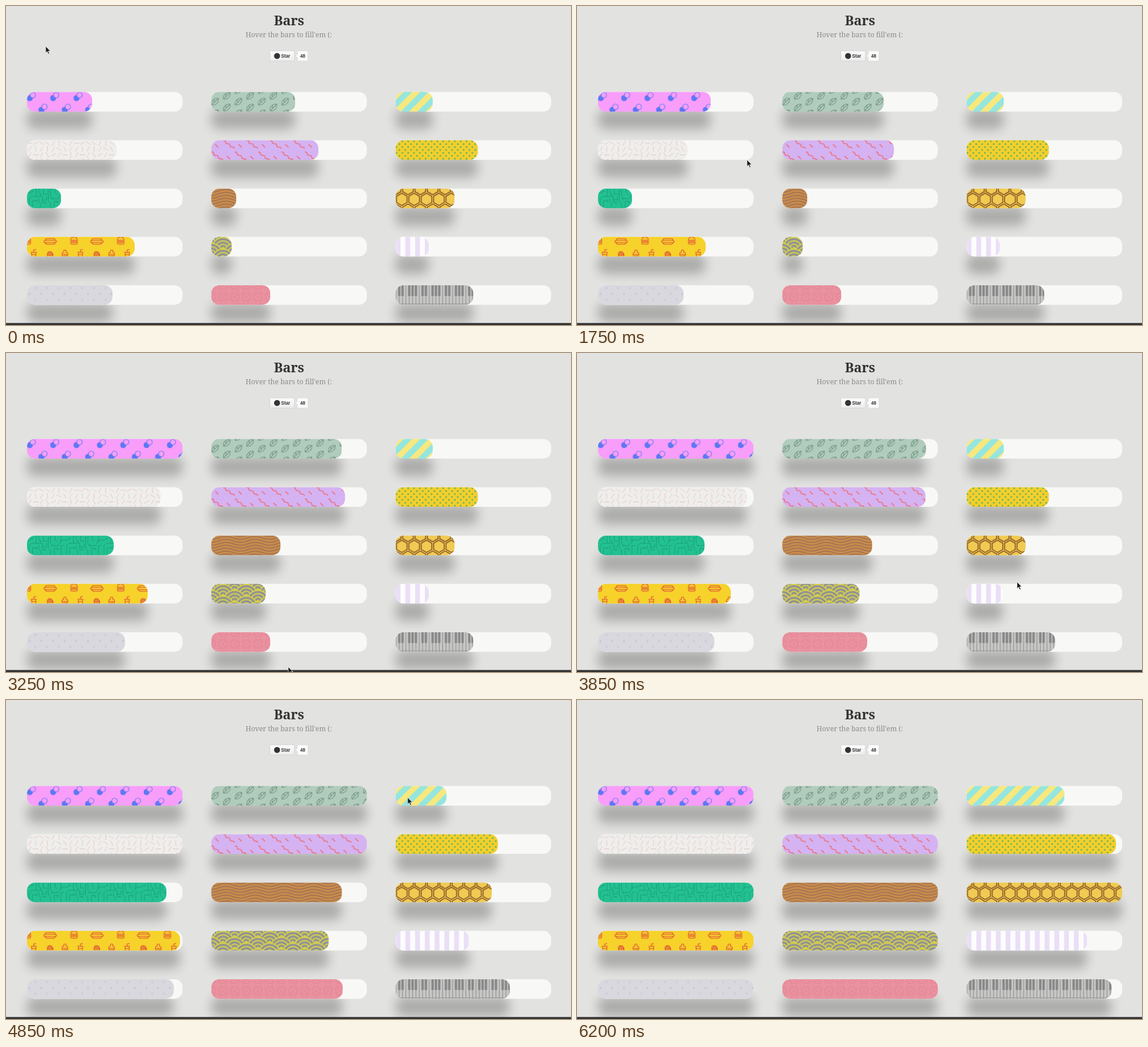
These frames come from a looping animation (997x562 px, 6250 ms). An HTML page:

```html
<!DOCTYPE html>
<html lang="en">
<head>
<meta charset="utf-8">
<title>Bars</title>
<style>
html, body { margin: 0; width: 100%; height: 100%; overflow: hidden; background: #e2e2e0; }
svg { display: block; }
.shadow { filter: blur(9.5px); opacity: .24; }
.slab { font-family: "Noto Serif", serif; text-anchor: middle; }
.btn { font: bold 8.2px "Liberation Sans", Arial, sans-serif; fill: #333; }
</style>
</head>
<body>
<svg id="stage" width="997" height="562" viewBox="0 0 997 562"></svg>
<script>
const LOOP = 6250, FULL = 274.5, HEIGHT = 34.5, U = 41.2;

// Small drawing helpers that return SVG markup
const rect = (x, y, w, h, fill) => `<rect x="${x}" y="${y}" width="${w}" height="${h}" fill="${fill}"/>`;
const disc = (x, y, r, fill) => `<circle cx="${x}" cy="${y}" r="${r}" fill="${fill}"/>`;
const ring = (x, y, r, stroke, width = 1, fill = 'none') =>
  `<circle cx="${x}" cy="${y}" r="${r}" fill="${fill}" stroke="${stroke}" stroke-width="${width}"/>`;
const line = (d, stroke, width = 1) => `<path d="${d}" fill="none" stroke="${stroke}" stroke-width="${width}"/>`;
const at = (x, y, body) => `<g transform="translate(${x} ${y})">${body}</g>`;
const times = (n, fn) => Array.from({ length: n }, (_, i) => fn(i)).join('');
const tile = (w, h, bg, body, transform = '') => ({ w, h, transform, body: rect(0, 0, w, h, bg) + body });
const SMALL = `scale(${U / 80})`;

let seed = 7;
const random = () => (seed = seed * 16807 % 2147483647) / 2147483647;

function bubbles() {
  const pair = disc(0, 0, 5.4, '#5d78f4') + ring(5.3, -5.2, 4.8, '#5d78f4', 1.1, '#f89dfa');
  return tile(U, U, '#f89dfa', at(5, 10.7, pair) + at(25.6, 31.3, pair));
}

function leaves() {
  const leaf = line('M64.3 1.8A19 19 0 0 1 41.8 24.3A19 19 0 0 1 64.3 1.8L41.8 24.3M49.9 16V4.5', '#6d917c', 2);
  return tile(80, 40, '#b1ccbc', at(0, 0, leaf) + at(-40, 20, leaf) + at(-40, -20, leaf), SMALL);
}

function diagonal() {
  const p = U / 2;
  return tile(p, p, '#f7e87e', rect(p / 2, 0, p / 2, p, '#94e6df'), 'rotate(45)');
}

function dashes() {
  const c = U / 4;
  const dash = i => {
    const a = Math.floor(random() * 6) * Math.PI / 6;
    const dx = Math.cos(a) * 5, dy = Math.sin(a) * 5;
    const x = (i % 8 + .5) * c, y = (Math.floor(i / 8) + .5) * c;
    return line(`M${x - dx} ${y - dy}L${x + dx} ${y + dy}`, i % 3 ? '#e6bbb3' : '#d2cbc6', .9);
  };
  return tile(U * 2, U, '#efeeec', times(32, dash));
}

function squiggles() {
  const wave = line('M0 0q4 0 4 3t4 3t4 3t4 3t4 3', '#f0645f', 1.4);
  const dash = line('M0 0l5.5 5.5', '#f0645f', 1.4);
  return tile(U, U, '#d5b2f2', at(21, 0, wave) + at(.4, 20.6, wave) + at(7, 7, dash) + at(27.6, 27.6, dash));
}

function dots() {
  const ink = '#63b35c';
  return tile(20, 20, '#f3cf2c', disc(3, 3, 3, ink) + disc(13, 13, 3, ink), SMALL);
}

function circuit() {
  const ink = '#159370';
  const nodes = [[12, 6], [30, 13], [47, 5], [56, 22], [21, 27], [40, 31], [75, 12], [68, 30]];
  return tile(U * 2, U, '#23c191',
    line('M0 10h6l6-4M5 41V22l5-5h10v-17M12 41V27h9M26 0v8l4 5M20 17h14v14h6M36 0v12h11V5M52 0v17l4 5'
      + 'M47 12v16l5 5v8M30 41v-8l-4-4v-8M60 41V28h8M56 22h13l6-10M62 0v9l5 5M82 10h-7V0M75 41V22h7M34 25h9v-8', ink)
    + nodes.map(([x, y]) => ring(x, y, 1.4, ink, 1, '#23c191')).join(''), 'scale(.8)');
}

function wood() {
  return tile(100, 20, '#c78c4b', times(4, i =>
    line(`M0 ${i * 10 - 7}c25 0 25-10 50-10s25 10 50 10`, '#91655a', 2.2)), SMALL);
}

function honeycomb() {
  const ink = '#7c4a20';
  return tile(28, 49, '#f0ca52',
    line('M14 10.4l12 6.9v13.9l-12 6.9L2 31.2V17.3z', ink, 2)
    + line('M0 13.8l12-6.9V0M0 34.7l12 6.9V49M16 0v6.9l12 6.9M16 49v-7.4l12-6.9', ink, 2), 'scale(.78)');
}

function food() {
  const draw = d => line(d, '#dc3f38', 1.05);
  const burger = draw('M-6-1q0-6 6-6t6 6zM-7 1H7M-6 3H6q0 3-3 3H-3q-3 0-3-3M-2-4h1M2-4h1');
  const hotdog = draw('M-8-1q-2-4 2-4H6q4 0 2 4M-11 0q0-2 2-2H9q2 0 2 2t-2 2H-9q-2 0-2-2M-9 2q1 3 4 3H5q3 0 4-3');
  const drink = draw('M-5-3H5M-4-3l1 11H3l1-11M0-3v-4l4-1M-3 1H3');
  const fries = draw('M-5 0l1 8H4l1-8q-5 4-10 0V-3h2v3V-5h2v6V-5h2v6V-4h2v4V-2h1v2');
  const cupcake = draw('M-5 1H5l-2 7H-3zM-5 1q-1-4 3-4q-1-4 2-4t2 4q4 0 3 4M-1 2v6M2 2v6');
  return tile(U * 2, U * 2, '#f6d22a', at(.6, 7, burger) + at(.6 + U * 2, 7, burger) + at(41, 8, hotdog)
    + at(12, 30, drink) + at(41, 31, fries) + at(67, 30, cupcake));
}

function scales() {
  const ink = '#d8d04a', bg = '#8f9296';
  const scale = times(3, i => ring(0, 0, 19.5 - i * 5.9, ink, 2.1, bg)) + disc(0, 0, 2.9, ink);
  return tile(U, U / 2, bg, times(5, i => {
    const x = i % 2 ? 0 : U / 2;
    return at(x, i * U / 4, scale) + at(x ? x - U : U, i * U / 4, scale);
  }));
}

function stripes() {
  return tile(17.2, 40, '#fdfcfd', rect(0, 0, 8.6, 40, '#eadff6'));
}

function crosses() {
  const cross = line('M-1.4-1.4l2.8 2.8M1.4-1.4l-2.8 2.8', '#c3bfd0', 1);
  return tile(U / 2, U / 2, '#d9d8de', at(15, 5, cross) + at(4.7, 15.3, cross));
}

function florals() {
  const p = U / 2, ink = '#eaa3ab';
  return tile(p, p, '#e88c9b', ring(p / 2, p / 2, 4, ink, .9) + disc(p / 2, p / 2, 1.3, ink)
    + line(`M0 5L5 0M${p - 5} 0l5 5M0 ${p - 5}l5 5M${p - 5} ${p}l5-5M0 ${p / 2}h4M${p - 4} ${p / 2}h4`, ink, .9)
    + disc(p / 2, 2, 1.2, ink) + disc(p / 2, p - 2, 1.2, ink));
}

function piano() {
  const key = U / 7;
  return tile(U, 40, '#c6c6c5', times(7, i => rect(i * key, 0, 1, 40, '#8b8b8b'))
    + [1, 2, 4, 5, 6].map(i => rect(i * key - 1.5, 0, 4, 19, '#868686')).join('')
    + rect(0, 32.5, U, 1, '#8b8b8b'));
}

// Column by column: pattern, start of growth, then widths at the start and at each later mark
const marks = [1750, 2600, 3250, 4400, 5350, 6200];
const bars = [
  [bubbles, 780, 115, 199, 258, 303],
  [dashes, 1780, 158, 207, 236, 287],
  [circuit, 1870, 60, 110, 153, 220, 275],
  [food, 2780, 190, 213, 254, 288],
  [crosses, 2880, 151, 173, 235, 286],
  [leaves, 1000, 148, 179, 209, 230, 275],
  [squiggles, 1420, 189, 197, 222, 236, 268, 295],
  [wood, 2320, 44, 66, 122, 192, 273, 340],
  [scales, 2640, 36, 96, 173, 245, 310],
  [florals, 3280, 104, 194, 274, 340],
  [diagonal, 4480, 65.5, 122.5, 172.5],
  [dots, 4300, 145, 151.5, 212.5, 263.5],
  [honeycomb, 3960, 104, 136.5, 206.5, 274.5],
  [stripes, 3770, 58.5, 99.5, 163.5, 212.5],
  [piano, 3480, 137, 185, 220, 256]
].map(([pattern, start, first, ...rest]) => {
  const later = marks.filter(m => m > start);
  return { ...pattern(), path: [[start, first], ...rest.map((w, i) => [later[i], w])] };
});

// Pointer route: time, x, y
const route = [
  [400, 70, 71], [600, 98, 135], [700, 98, 135], [850, 150, 170], [1050, 370, 175], [1200, 470, 185],
  [1350, 480, 250], [1550, 400, 262], [1750, 300, 271], [1900, 220, 330], [2050, 190, 345], [2300, 380, 345],
  [2600, 495, 374], [2750, 310, 420], [2900, 140, 490], [3050, 230, 515], [3250, 498, 553], [3480, 690, 515],
  [3700, 760, 470], [3800, 775, 430], [3960, 780, 345], [4400, 781, 266], [4500, 770, 185], [4900, 700, 170],
  [5250, 500, 153], [5350, 443, 113], [5900, 34, 28], [5950, 31, 15]
];

function follow(path, t) {
  const next = path.findIndex(p => p[0] > t);
  if (next === 0) return path[0].slice(1);
  if (next < 0) return path[path.length - 1].slice(1);
  const a = path[next - 1], b = path[next], k = (t - a[0]) / (b[0] - a[0]);
  return a.slice(1).map((v, i) => v + (b[i + 1] - v) * k);
}

const stage = document.getElementById('stage');
stage.innerHTML = `<defs>
  <linearGradient id="face" x2="0" y2="1"><stop stop-color="#fcfcfc"/><stop offset="1" stop-color="#ececec"/></linearGradient>
  ${bars.map((b, i) => `<pattern id="p${i}" width="${b.w}" height="${b.h}" patternUnits="userSpaceOnUse"
    patternTransform="${b.transform}">${b.body}</pattern>`).join('')}
</defs>
${rect(0, 0, 997, 562, '#e2e2e0')}
<text class="slab" x="499.5" y="33.5" font-size="23.5" font-weight="700" fill="#333331">Bars</text>
<text class="slab" x="499" y="55" font-size="12.3" fill="#8b8b89">Hover the bars to fill'em (:</text>
<rect x="465.5" y="79" width="43.5" height="18" rx="2" fill="url(#face)" stroke="#d3d3d2"/>
${disc(478.3, 88, 5.3, '#333')}
<text class="btn" x="485.5" y="91">Star</text>
<path d="M515 79h17q1 0 1 1v16q0 1-1 1h-17q-1 0-1-1v-5l-3-3 3-3v-5q0-1 1-1z" fill="#fbfbfb" stroke="#d6d6d5" stroke-width=".8"/>
<text class="btn" x="523.6" y="91" text-anchor="middle">48</text>
${bars.map((b, i) => at(37 + 325.25 * Math.floor(i / 5), 151.5 + 85.1 * (i % 5),
  `<rect class="shadow" y="31" height="${HEIGHT}" rx="14"/>
  <rect width="${FULL}" height="${HEIGHT}" rx="14" fill="#f8f8f6"/>
  <rect class="fill" height="${HEIGHT}" rx="14" fill="url(#p${i})"/>`)).join('')}
${rect(0, 558.5, 997, 4, '#333333')}
<path id="pointer" d="M0 0v11.6l2.7-2.5 2 4.4 1.9-.8-2-4.3h3.7z" fill="#1c1c1c" stroke="#f4f4f4" stroke-width=".7"/>`;

const fills = stage.querySelectorAll('.fill');
const shadows = stage.querySelectorAll('.shadow');
const pointer = document.getElementById('pointer');

function draw() {
  const t = Math.floor(performance.now() % LOOP / 50) * 50;
  bars.forEach((b, i) => {
    const w = Math.min(FULL, follow(b.path, t)[0]);
    fills[i].setAttribute('width', w);
    shadows[i].setAttribute('width', w);
  });
  const [x, y] = follow(route, t);
  pointer.setAttribute('transform', `translate(${x} ${y})`);
  pointer.setAttribute('visibility', t < 6000 ? 'visible' : 'hidden');
  requestAnimationFrame(draw);
}
draw();
</script>
</body>
</html>
```
